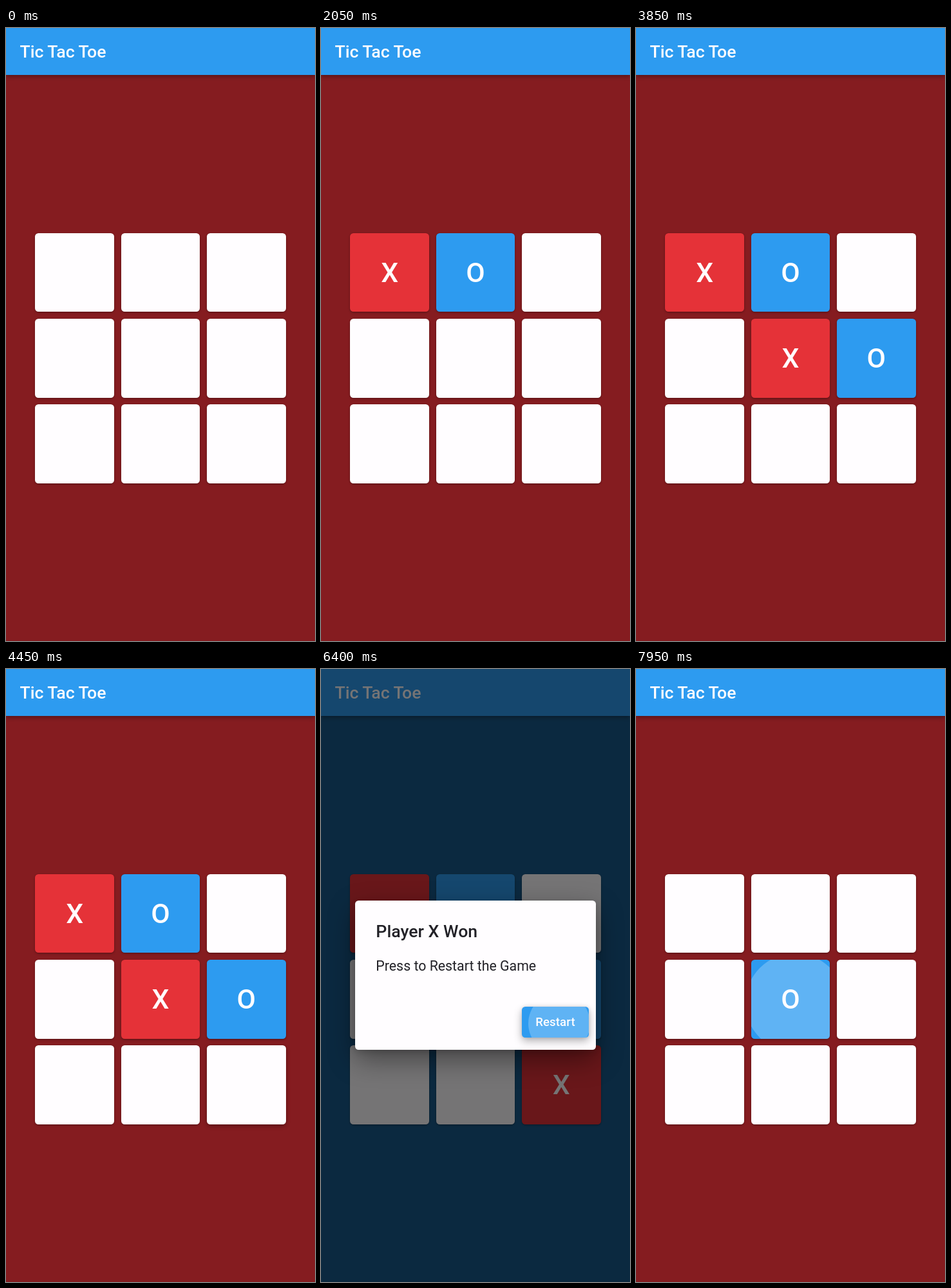
Animation of 480 by 953 pixels, one loop 8 s. Source, as an HTML page:

```html
<!DOCTYPE html>
<html lang="en">
<head>
<meta charset="utf-8">
<title>Tic Tac Toe</title>
<style>
  html, body { margin: 0; width: 100%; height: 100%; overflow: hidden; }
  body { position: relative; font: 500 26.67px Roboto, sans-serif; color: #fffdff; }
  body * { position: absolute; box-sizing: border-box; white-space: nowrap; }
  #bar { left: 0; top: 0; width: 100%; height: 73px; background: #2d9bf0; }
  #bar span { left: 21.5px; top: 17px; line-height: 40px; }
  .button { border-radius: 5.33px; background: #fffdff; }
  .clip { inset: 0; border-radius: inherit; overflow: hidden; }
  .ripple { border-radius: 50%; background: #fff; }
  .label { inset: 0; text-align: center; }
  .tile { width: 122.67px; height: 122.67px; }
  .tile .label { font-size: 42.67px; line-height: 122.67px; }
  #barrier { inset: 0; background: #000; }
  #dialog { left: 53.33px; top: 360px; width: 373.33px; height: 231.7px; border-radius: 5.33px;
    background: #fffdff; color: #222127; box-shadow: 0 15px 42px rgba(0,0,0,.42), 0 3px 8px rgba(0,0,0,.15); }
  #dialog h1, #dialog p { left: 32px; margin: 0; line-height: 40px; }
  #dialog h1 { top: 28px; font-size: 26.67px; font-weight: 500; }
  #dialog p { top: 82px; font-size: 21.33px; font-weight: 400; }
  #restart { left: 258.67px; top: 165.3px; width: 104px; height: 48px; background: #2d9bf0; color: #fffdff; }
  #restart .label { font-size: 18.67px; line-height: 48px; letter-spacing: .1px; }
</style>
</head>
<body>
<div id="bar"><span>Tic Tac Toe</span></div>
<div id="board"></div>
<div id="barrier"></div>
<div id="dialog">
  <h1>Player X Won</h1>
  <p>Press to Restart the Game</p>
</div>
<script>
const LOOP = 8000;
const COLORS = { X: '#e53238', O: '#2d9bf0', empty: '#fffdff' };
const FADE = 150;

// Touch points are relative to the pressed button.
const moves = [
  { cell: 0, mark: 'X', down: 350, up: 450, x: 72, y: 74 },
  { cell: 1, mark: 'O', down: 1200, up: 1300, x: 75, y: 76 },
  { cell: 4, mark: 'X', down: 2590, up: 2690, x: 80, y: 80 },
  { cell: 5, mark: 'O', down: 3200, up: 3300, x: 75, y: 78 },
  { cell: 8, mark: 'X', down: 4410, up: 4510, x: 72, y: 75 },
  { cell: 4, mark: 'O', down: 7770, up: 7865, x: 92, y: 88 }
];
const restartTap = { down: 6000, up: 6460, x: 72, y: 30 };
const won = moves[4].up, reset = restartTap.up;

const byId = id => document.getElementById(id);
const clamp = v => Math.min(1, Math.max(0, v));

// Cubic Bezier (.25, .1, .25, 1)
function ease(x) {
  const curve = (s, a, b) => 3 * (1 - s) ** 2 * s * a + 3 * (1 - s) * s * s * b + s ** 3;
  let lo = 0, hi = 1;
  for (let i = 0; i < 20; i++) {
    const mid = (lo + hi) / 2;
    if (curve(mid, .25, .25) < x) lo = mid; else hi = mid;
  }
  return curve(lo, .1, 1);
}

const shadow = e =>
  `0 ${e * .7}px ${e * 1.6}px rgba(0,0,0,.3), 0 0 ${e * .6}px rgba(0,0,0,.12)`;

function add(parent, className) {
  const el = document.createElement('div');
  el.className = className;
  parent.append(el);
  return el;
}

function makeButton(parent, className, width, height) {
  const el = add(parent, 'button ' + className);
  const ripple = add(add(el, 'clip'), 'ripple');
  const label = add(el, 'label');
  return { el, ripple, label, width, height };
}

function drawPress(button, tap, t) {
  const { el, ripple, width, height } = button;
  const active = tap && t >= tap.down && t < tap.up + 400;
  ripple.style.opacity = 0;
  el.style.boxShadow = shadow(2);
  if (!active) return;

  const held = Math.min(t, tap.up) - tap.down;
  const released = Math.max(0, t - tap.up);
  const k = ease(clamp(held / 1000 + released / 225));
  const reach = Math.hypot(width, height) / 2;
  const r = reach * .3 + (reach * .7 + 5) * k;
  const x = tap.x + (width / 2 - tap.x) * k;
  const y = tap.y + (height / 2 - tap.y) * k;
  Object.assign(ripple.style, {
    left: x - r + 'px', top: y - r + 'px', width: 2 * r + 'px', height: 2 * r + 'px',
    opacity: .24 * clamp((t - tap.down) / 75) * (1 - clamp((released - 225) / 150))
  });
  const lift = clamp(clamp(held / 200) - released / 200);
  el.style.boxShadow = shadow(2 + 6 * ease(lift));
}

const tiles = Array.from({ length: 9 }, (_, i) => {
  const tile = makeButton(byId('board'), 'tile', 122.67, 122.67);
  tile.el.style.left = 45.33 + i % 3 * 133.33 + 'px';
  tile.el.style.top = 318.67 + Math.floor(i / 3) * 133.33 + 'px';
  return tile;
});
const restart = makeButton(byId('dialog'), '', 104, 48);
restart.el.id = 'restart';
restart.label.textContent = 'Restart';
byId('bar').style.boxShadow = shadow(4);

function draw(t) {
  const played = moves.filter(m => m.up <= t);
  document.body.style.background = played.length % 2 ? '#195a8b' : '#851c20';

  tiles.forEach((tile, i) => {
    const move = played.find(m => m.cell === i && (t < reset || m.up > reset));
    const mark = move ? move.mark : '';
    tile.label.textContent = mark;
    tile.el.style.background = COLORS[mark || 'empty'];
    drawPress(tile, moves.find(m => m.cell === i && t >= m.down && t < m.up + 400), t);
  });

  const shown = ease(t < reset ? clamp((t - won) / FADE) : clamp(1 - (t - reset) / FADE));
  byId('barrier').style.opacity = .54 * shown;
  byId('dialog').style.opacity = shown;
  drawPress(restart, restartTap, t);
}

const start = performance.now();
function frame() {
  draw((performance.now() - start) % LOOP);
  requestAnimationFrame(frame);
}
draw(0);
requestAnimationFrame(frame);
</script>
</body>
</html>
```
